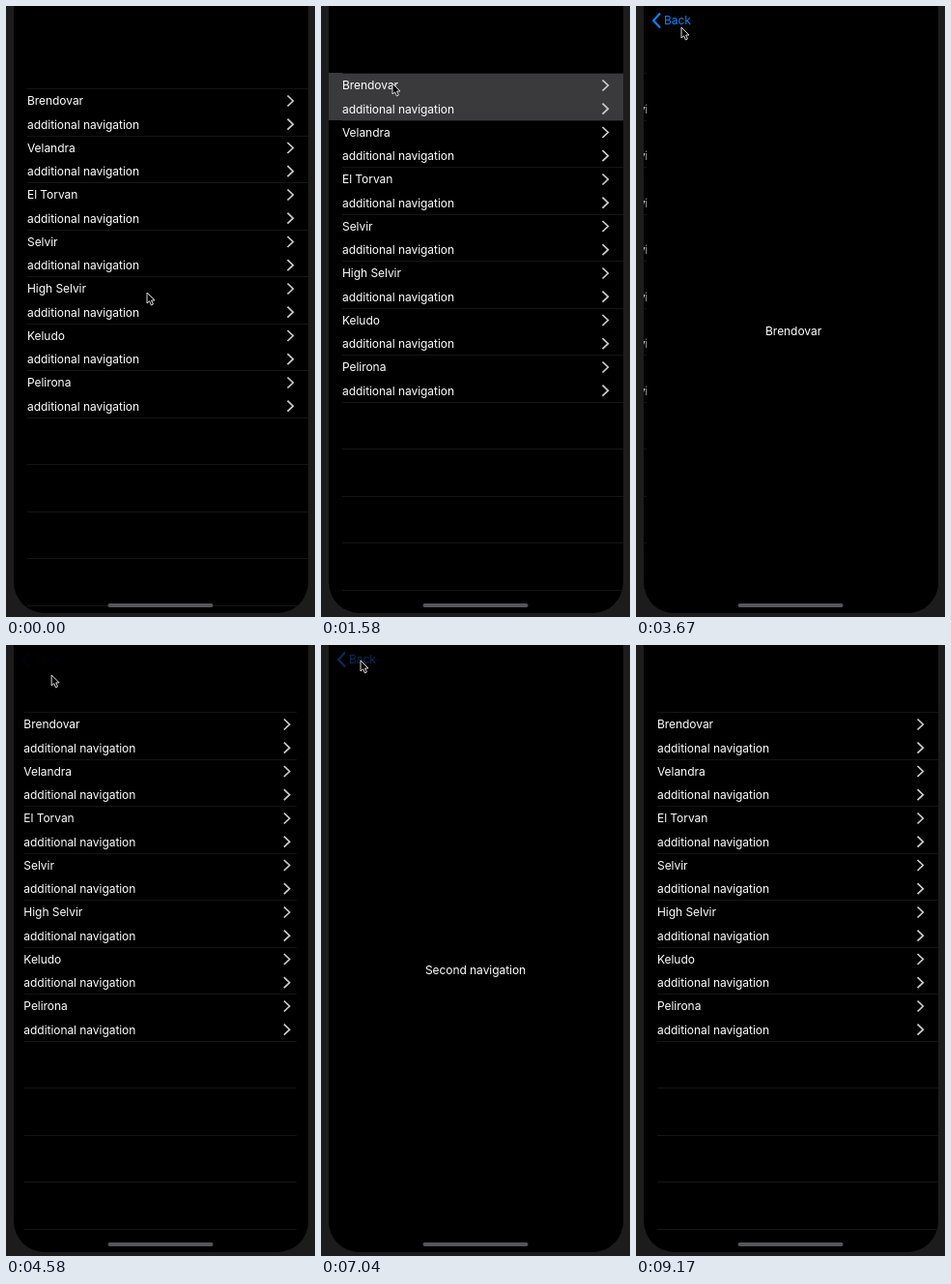
An HTML page for the animation above (9.58 s loop, 320 by 631 pixels).

```html
<!DOCTYPE html>
<html lang="en">
<head>
<meta charset="utf-8">
<title>List navigation</title>
<style>
  html, body { margin: 0; width: 100%; height: 100%; overflow: hidden; background: #1c1c1d; }
  svg { display: block; }
  text { font: 12px Inter, Roboto, sans-serif; letter-spacing: -.05px; fill: #fff; }
  path { fill: none; }
  .line { fill: #151516; }
  .more { stroke: #ccc; stroke-width: 1.7; }
  #back text { fill: #0a84ff; }
  #back path { stroke: #0a84ff; stroke-width: 2.1; }
</style>
</head>
<body>
<svg width="320" height="631" viewBox="0 0 320 631">
  <clipPath id="screen"><rect x="8" y="-40" width="305" height="667" rx="32"/></clipPath>
  <g clip-path="url(#screen)">
    <rect width="320" height="631"/>
    <g id="list"><rect id="glow" x="8" y="69" width="305" height="49" fill="#3a3a3c"/></g>
    <g id="page">
      <rect x="8" width="305" height="631"/>
      <text id="label" x="160" y="340.3" text-anchor="middle"></text>
    </g>
    <g id="back">
      <path d="M25 7.5L18 15L25 22.5"/>
      <text x="29" y="19.3">Back</text>
    </g>
  </g>
  <rect x="105.5" y="617" width="109" height="4" rx="2" fill="#55555a"/>
  <path id="cursor" d="M0 0V11L2.6 8.8L4.4 13L6.4 12L4.6 8H8Z" style="fill:#000;stroke:#ddd"/>
</svg>
<script>
const LOOP = 9580, WIDTH = 305, PITCH = 48.5;
const names = ["Brendovar", "Velandra", "El Torvan", "Selvir", "High Selvir", "Keludo", "Pelirona"];
const second = "Second navigation";

// [start, 1 = push / 0 = pop, page label]
const moves = [
  [1630, 1, second], [2850, 0, second], [3340, 1, names[0]], [4330, 0, names[0]],
  [5330, 1, second], [7080, 0, second], [7460, 1, names[0]], [8500, 0, names[0]]
];
const presses = [2770, 4250, 7000, 8420];
// [time, x, y]
const track = [
  [0, 146, 296], [250, 146, 296], [960, 78, 86], [1200, 74, 80], [2380, 74, 80],
  [2760, 47, 22], [4000, 47, 22], [4080, 44, 15], [4400, 44, 15], [5080, 62, 106],
  [5500, 62, 106], [6080, 46, 34], [6500, 46, 34], [6900, 41, 16], [8550, 41, 16],
  [9170, 60, -16], [LOOP, 60, -16]
];

const el = id => document.getElementById(id);
const [list, glow, page, label, back, cursor] =
  ["list", "glow", "page", "label", "back", "cursor"].map(el);

function add(tag, attrs, text = "") {
  const node = document.createElementNS("http://www.w3.org/2000/svg", tag);
  for (const key in attrs) node.setAttribute(key, attrs[key]);
  node.textContent = text;
  list.append(node);
}

function addEntry(text, y) {
  add("text", { x: 22, y: y + 4.3 }, text);
  add("path", { class: "more", d: `M291.5 ${y - 5.5}L297.3 ${y}L291.5 ${y + 5.5}` });
}

for (let i = 0; i < 12; i++)
  add("rect", { class: "line", x: 22, y: Math.round(69 + PITCH * i), width: 291, height: 1 });
names.forEach((name, i) => {
  addEntry(name, 82 + PITCH * i);
  addEntry("additional navigation", 106.2 + PITCH * i);
});

const clamp = v => Math.min(1, Math.max(0, v));
const smooth = v => v * v * (3 - 2 * v);
// critically damped spring, 0 to 1
const spring = (ms, rate) => ms <= 0 ? 0 : 1 - (1 + rate * ms / 1000) * Math.exp(-rate * ms / 1000);
const place = (node, x, y) => node.setAttribute("transform", `translate(${x} ${y})`);

function glowAt(t) {
  if (t < 1580) return 0;
  if (t < 5250) return 1 - clamp((t - 2850) / 400);
  return 1 - clamp((t - 7080) / 380);
}

function cursorAt(t) {
  const i = track.findIndex(k => k[0] > t);
  const [t0, x0, y0] = track[i - 1], [t1, x1, y1] = track[i];
  const k = smooth((t - t0) / (t1 - t0));
  return [x0 + (x1 - x0) * k, y0 + (y1 - y0) * k];
}

function draw(t) {
  const move = moves.filter(m => m[0] <= t).pop();
  let open = 0;
  if (move) {
    const k = spring(t - move[0], 20);
    open = move[1] ? k : 1 - k;
    label.textContent = move[2];
  }
  const pressed = presses.some(p => t >= p && t < p + 80);
  const popping = move && !move[1];

  place(list, -.3 * WIDTH * open, 16 * (1 - spring(t - 40, 9)));
  list.setAttribute("opacity", 1 - .1 * open);
  glow.setAttribute("opacity", glowAt(t));
  place(page, WIDTH * (1 - open), 0);
  back.setAttribute("opacity", pressed ? .35 : open * (popping ? .6 : 1));
  place(cursor, ...cursorAt(t));
}

const start = performance.now();
function tick() {
  draw((performance.now() - start) % LOOP);
  requestAnimationFrame(tick);
}
tick();
</script>
</body>
</html>
```
